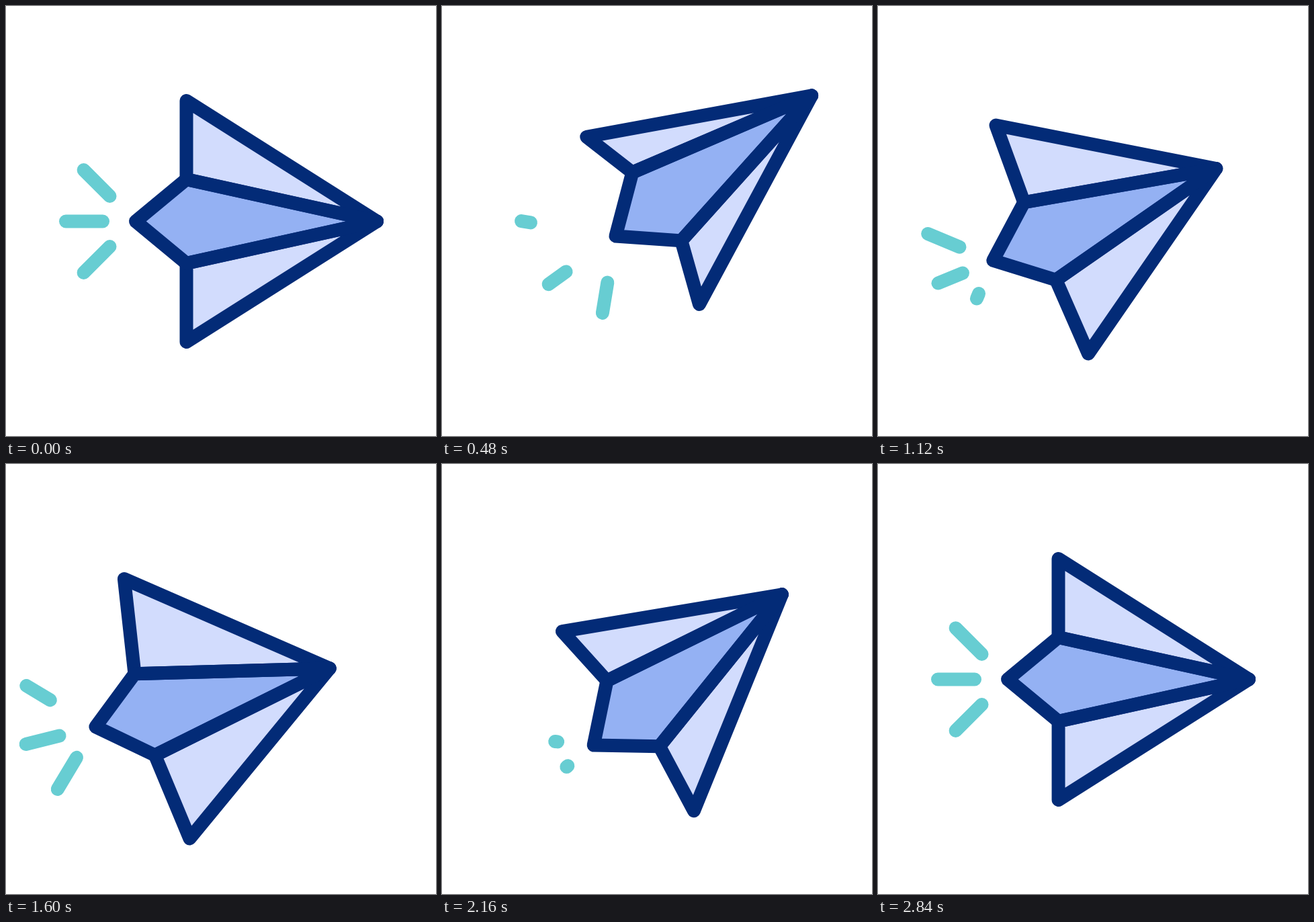
An HTML page with a canvas for the animation above (3 s loop, 640x640 px).

```html
<!DOCTYPE html>
<html lang="en">
<head>
<meta charset="utf-8">
<title>Paper plane</title>
<style>
  html, body { margin: 0; width: 100%; height: 100%; overflow: hidden; background: #fff; }
  canvas { display: block; width: 100vw; height: 100vh; }
</style>
</head>
<body>
<canvas id="stage" width="640" height="640"></canvas>
<script>
const ctx = document.getElementById('stage').getContext('2d');
const LOOP = 3000, STEP = 40;
const NAVY = '#032b77', LIGHT = '#d2dcfd', BLUE = '#94b1f3', TEAL = '#67cdd2';

// Pose: centre x, y, angle in degrees, then the flex of the upper and lower wing tip.
const REST  = [372.5, 320.5, 0, 0, 0, 0, 0];
const CLIMB = [411.5, 219.3, -43.7, -30, 42, -41, -30];
const DIP   = [306.2, 348.6, -13.45, 19.6, -24.7, 21, 16.4];
const RISE  = [365.8, 306.4, -38.7, -6, 18, -20, -10];
const MOVES = [
  { start: 100, end: 770, from: REST, to: CLIMB },
  { start: 775, end: 1465, from: CLIMB, to: DIP },
  { start: 1507, end: 2185, from: DIP, to: RISE },
  { start: 2185, end: 2855, from: RISE, to: REST }
];

// Trails leave along their rays, then grow again from the inner end.
const DIAG = Math.SQRT1_2;
const TRAILS = [
  { x: -218, y: -37.5, dx: -DIAG, dy: -DIAG, leave: [80, 1370], grow: [784, 2094] },
  { x: -228.5, y: 0, dx: -1, dy: 0, leave: [180, 1482], grow: [860, 2108] },
  { x: -218, y: 37.5, dx: -DIAG, dy: DIAG, leave: [293, 1587], grow: [1024, 2168] }
];
const RAY = 100, DASH = 55, LEAVE_TIME = 464, GROW_TIME = 400;

const clamp = v => Math.min(1, Math.max(0, v));
const mix = (a, b, k) => a + (b - a) * k;
const smooth = k => k * k * (3 - 2 * k);

// Cubic bezier easing (0.6, 0, 0.2, 1).
function ease(x) {
  if (x <= 0 || x >= 1) return clamp(x);
  let lo = 0, hi = 1;
  for (let i = 0; i < 24; i++) {
    const u = (lo + hi) / 2, v = 1 - u;
    if (1.8 * u * v * v + 0.6 * u * u * v + u * u * u < x) lo = u; else hi = u;
  }
  return smooth(lo);
}

function poseAt(t) {
  const move = MOVES.filter(m => t >= m.start).pop() || MOVES[0];
  const k = ease((t - move.start) / (move.end - move.start));
  return move.from.map((v, i) => mix(v, move.to[i], k));
}

function path(points, close) {
  ctx.beginPath();
  points.forEach(p => ctx.lineTo(p[0], p[1]));
  if (close) ctx.closePath();
}

function fill(points, color) {
  path(points, true);
  ctx.fillStyle = color;
  ctx.fill();
}

function stroke(points, color, close) {
  path(points, close);
  ctx.strokeStyle = color;
  ctx.stroke();
}

function drawPlane(ax, ay, bx, by) {
  const nose = [179.5, 0], tail = [-179.5, 0];
  const upper = [-104, -62.5], lower = [-104, 62.5];
  const tipA = [-104 + ax, -179.5 + ay], tipB = [-104 + bx, 179.5 + by];
  const wings = [[nose, tipA, upper], [nose, tipB, lower]];
  const body = [nose, upper, tail, lower];
  wings.forEach(w => fill(w, LIGHT));
  fill(body, BLUE);
  wings.forEach(w => stroke(w, NAVY, true));
  stroke(body, NAVY, true);
}

function trailSpan(trail, t) {
  const cycle = t >= trail.leave[1] ? 1 : 0;
  const growth = (t - trail.grow[cycle]) / GROW_TIME;
  if (growth >= 0) return [0, DASH * smooth(clamp(growth))];
  const k = clamp((t - trail.leave[cycle]) / LEAVE_TIME) ** 2;
  return [RAY * k, mix(DASH, RAY, k)];
}

function drawTrail(trail, t) {
  const [near, far] = trailSpan(trail, t);
  if (far - near < 0.3) return;
  const at = d => [trail.x + trail.dx * d, trail.y + trail.dy * d];
  stroke([at(near), at(far)], TEAL, false);
}

function draw(t) {
  const [x, y, angle, ...flex] = poseAt(t);
  ctx.fillStyle = '#fff';
  ctx.fillRect(0, 0, 640, 640);
  ctx.save();
  ctx.translate(x, y);
  ctx.rotate(angle * Math.PI / 180);
  ctx.lineWidth = 20;
  ctx.lineCap = ctx.lineJoin = 'round';
  TRAILS.forEach(trail => drawTrail(trail, t));
  drawPlane(...flex);
  ctx.restore();
}

const begun = performance.now();
function tick() {
  const t = (performance.now() - begun) % LOOP;
  draw(Math.floor(t / STEP) * STEP);
  requestAnimationFrame(tick);
}
tick();
</script>
</body>
</html>
```
